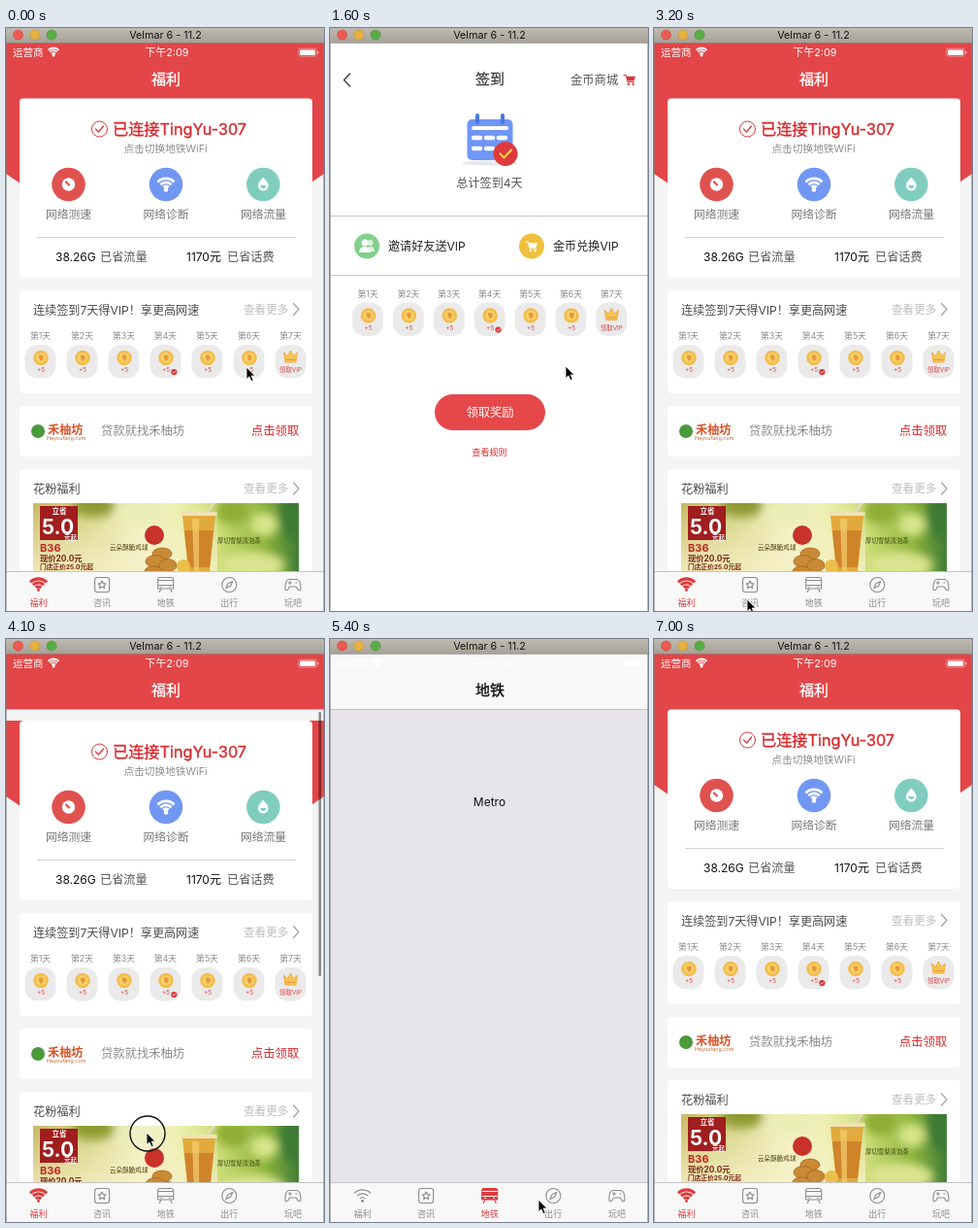
An HTML page that plays this animation: 328x600 px, repeating every 7100 ms.

```html
<!DOCTYPE html>
<html lang="zh-CN">
<head>
<meta charset="utf-8">
<title>App demo</title>
<style>
html, body { margin: 0; width: 100%; height: 100%; overflow: hidden; background: #fff; }
svg { display: block; }
#stage { width: 328px; height: 600px; overflow: hidden; }
text { font-family: Inter, "Noto Sans CJK SC", "Noto Sans CJK", sans-serif; }
.m { text-anchor: middle; }
.b { font-weight: 700; }
.med { fill: currentColor; stroke: currentColor; stroke-width: .35; }
.line { fill: none; stroke: currentColor; stroke-linecap: round; stroke-linejoin: round; }
.tab { color: #8b8b8b; }
.tab.on { color: #dc3c3e; }
.arc { stroke-linecap: butt; }
.on .arc { stroke-width: 3.1; }
.on .body { fill: currentColor; }
.on .seam { stroke: #f8f8f8; }
.off { display: none; }
</style>
</head>
<body>
<svg id="stage" viewBox="0 0 328 600">
  <defs>
    <linearGradient id="chrome" x2="0" y2="1">
      <stop stop-color="#bfbab0"/><stop offset="1" stop-color="#a5a198"/>
    </linearGradient>
    <linearGradient id="meadow">
      <stop stop-color="#c9b865"/><stop offset=".2" stop-color="#d5d384"/>
      <stop offset=".4" stop-color="#f5f1c4"/><stop offset=".55" stop-color="#ecefae"/>
      <stop offset=".7" stop-color="#cbdc76"/><stop offset=".87" stop-color="#8db33b"/>
      <stop offset="1" stop-color="#437f38"/>
    </linearGradient>
    <linearGradient id="haze" x2="0" y2="1">
      <stop stop-color="#f6f0c8" stop-opacity="0"/><stop offset=".6" stop-color="#f6f0c8" stop-opacity=".8"/>
    </linearGradient>
    <filter id="soft"><feGaussianBlur stdDeviation="5"/></filter>

    <g id="wifi" class="line">
      <path class="arc" d="M-8.5-2.6a12 12 0 0 1 17 0M-5.6.2a8 8 0 0 1 11.2 0M-2.7 3a4 4 0 0 1 5.4 0"/>
      <circle cy="5.4" r=".9" fill="currentColor"/>
    </g>
    <rect id="badge" x="-16" y="-17" width="32" height="34.5" rx="13" fill="#ebeaea"/>
    <g id="coin">
      <use href="#badge"/>
      <circle cx=".5" cy="-3.5" r="7.8" fill="#f3bf50"/>
      <circle cx=".5" cy="-3.5" r="5.9" fill="#f8cf62" stroke="#eeb048" stroke-width=".8"/>
      <path d="M-1.5-6.500v3l2 3.500 2.500-2.500v-3l-1.500-1z" fill="#e59a3a"/>
      <text class="m" y="11" x=".5" font-size="6.5" fill="#dc4446">+5</text>
    </g>
    <g id="crown">
      <use href="#badge"/>
      <path d="M-7-9l4 3.5L0-11l3 5.5L7-9 5.5 1h-11z" fill="#f5c453" stroke="#eeb048" stroke-linejoin="round"/>
      <path d="M-5-1.5H5" stroke="#e59a3a"/>
      <text class="m" y="11" font-size="6.4" fill="#dc4446">领取VIP</text>
    </g>
    <g id="more">
      <text x="245" font-size="11.6" fill="#bdbdbd">查看更多</text>
      <path class="line" d="M296.5-10l5.5 6-5.5 6" color="#a3a3a3" stroke-width="1.2"/>
    </g>
    <g id="cart">
      <path class="line" d="M-6-5h2.3l1.700 7h6.5"/>
      <path d="M-3.6-3.8H6L4.6 1h-7z" fill="currentColor"/>
      <circle cx="-1.3" cy="4.3" r="1.2" fill="currentColor"/><circle cx="3.7" cy="4.3" r="1.2" fill="currentColor"/>
    </g>
    <g id="status" color="#fff" fill="#fff" font-size="10.5">
      <text x="7" y="29">运营商</text>
      <use href="#wifi" transform="translate(49 24.5) scale(.66)" stroke-width="2.8"/>
      <text class="m" x="166" y="29" font-size="10.8">下午2:09</text>
      <rect x="301.7" y="21.2" width="18.6" height="8" rx="2" fill="none" stroke="#fff" stroke-opacity=".5" stroke-width=".8"/>
      <rect x="303" y="22.5" width="16" height="5.4" rx="1"/>
      <rect x="321.2" y="23.7" width="1.2" height="3" rx=".6" opacity=".6"/>
    </g>
  </defs>

  <g id="main">
    <g id="home">
      <rect width="328" height="600" fill="#f4f4f4"/>
      <g id="scroll">
        <path d="M0 72H328V150L314 159.500H14L0 150z" fill="#e24648"/>
        <g fill="#fff">
          <rect x="14" y="72" width="302" height="185" rx="4.5"/>
          <rect x="14" y="270" width="302" height="106" rx="4.5"/>
          <rect x="14" y="389" width="302" height="52" rx="4.5"/>
          <rect x="14" y="454" width="302" height="160" rx="4.5"/>
        </g>

        <g class="line" color="#d9393b">
          <circle cx="96.5" cy="104" r="8"/><path d="M92.5 104l3 3 5-6" stroke-width="1.3"/>
        </g>
        <text class="med" x="110" y="110" font-size="16.2" color="#d8292c">已连接TingYu-307</text>
        <text class="m" x="164.5" y="128" font-size="10.7" fill="#8c8c8c">点击切换地铁WiFi</text>

        <circle cx="64.5" cy="161" r="17.3" fill="#e05250"/>
        <circle cx="64.5" cy="161" r="6.7" fill="#fff"/>
        <path class="line" d="M65 161.500l-3-3" color="#e05250" stroke-width="2.2"/>
        <circle cx="165" cy="161" r="17.3" fill="#7197f3"/>
        <use href="#wifi" transform="translate(165 161)" color="#fff" stroke-width="2.8"/>
        <circle cx="265.3" cy="161" r="17.3" fill="#80cdbf"/>
        <path d="M265.3 153.500c3 3.600 5.3 5.800 5.3 8.800a5.3 5.3 0 0 1-10.6 0c0-3 2.3-5.2 5.3-8.800z" fill="#fff"/>
        <path d="M262.300 162h6a3 3 0 0 1-6 0z" fill="#80cdbf"/>
        <g class="m" font-size="11.8" fill="#777">
          <text x="64.5" y="196">网络测速</text><text x="165" y="196">网络诊断</text><text x="265.5" y="196">网络流量</text>
        </g>

        <path d="M32 215.500H299" stroke="#d2d2d2"/>
        <g font-size="12" fill="#111">
          <text x="51" y="240">38.26G</text><text x="186" y="240">1170元</text>
          <g fill="#555" font-size="12.2"><text x="97" y="240">已省流量</text><text x="228" y="240">已省话费</text></g>
        </g>

        <text x="28" y="294.7" font-size="12.1" fill="#4c4c4c">连续签到7天得VIP！享更高网速</text>
        <use href="#more" y="293.5"/>
        <g id="homeDays"></g>

        <circle cx="33" cy="415" r="7" fill="#4b9a3c"/>
        <text class="b" x="43" y="418" font-size="12.2" fill="#d9562c">禾柚坊</text>
        <text x="42" y="424" font-size="5.4" fill="#c0662f">Heyoufang.com</text>
        <text x="98" y="419" font-size="12.3" fill="#8a8a8a">贷款就找禾柚坊</text>
        <text x="253" y="419" font-size="12.3" fill="#d8292c">点击领取</text>

        <text x="28" y="478.5" font-size="12.2" fill="#4c4c4c">花粉福利</text>
        <use href="#more" y="478"/>
        <svg x="28" y="489" width="274" height="110">
          <rect width="274" height="110" fill="url(#meadow)"/>
          <g filter="url(#soft)">
            <ellipse cx="62" cy="4" rx="22" ry="12" fill="#8a962c"/>
            <ellipse cx="112" cy="10" rx="26" ry="14" fill="#e9edb4"/>
            <ellipse cx="206" cy="8" rx="18" ry="14" fill="#8fae36"/>
            <ellipse cx="238" cy="22" rx="14" ry="12" fill="#d8e68c"/>
            <ellipse cx="268" cy="12" rx="14" ry="26" fill="#3d7a36"/>
            <ellipse cx="226" cy="64" rx="34" ry="14" fill="#dbe48e"/>
          </g>
          <rect width="190" height="110" fill="url(#haze)"/>
          <rect x="7" y="3" width="39" height="35" fill="#a01e1e"/>
          <g fill="#fff">
            <text class="m b" x="27" y="11" font-size="7.5">立省</text>
            <text class="b" x="9" y="32" font-size="21">5.0</text>
            <text class="b" x="32" y="37.5" font-size="6.4">元起</text>
          </g>
          <g class="b" fill="#7a2414">
            <text x="7" y="50" font-size="11" fill="#c3281f">B36</text>
            <text x="7" y="60" font-size="8.3">现价20.0元</text>
            <text x="7" y="68" font-size="6.7">门店正价25.0元起</text>
          </g>
          <text x="79" y="48" font-size="6.6" fill="#4b3a10">云朵酥脆鸡球</text>
          <circle cx="125" cy="33" r="10" fill="#c8322b"/>
          <g fill="#c98a35" stroke="#a9661f" stroke-width=".8">
            <ellipse cx="133" cy="52" rx="10" ry="6"/><ellipse cx="126" cy="60" rx="10" ry="6.5"/>
            <ellipse cx="139" cy="64" rx="9" ry="6.5"/><ellipse cx="124" cy="70" rx="9" ry="5"/>
          </g>
          <path d="M176 14L188-2" stroke="#e7d9b8" stroke-width="2.5"/>
          <path d="M154 12H188L181 80H161z" fill="#e2aa3c"/>
          <path d="M156 28H186L182 66H160z" fill="#d0842a"/>
          <path d="M164 16h7v54h-5z" fill="#f3cf6f" opacity=".7"/>
          <rect x="152" y="9" width="38" height="4" rx="2" fill="#f0e3b4"/>
          <circle cx="155" cy="65" r="7" fill="#eac04a"/>
          <text x="190" y="41" font-size="6.4" fill="#3f4a10">厚切雪梨清泡茶</text>
        </svg>
      </g>
      <rect y="15" width="328" height="57.5" fill="#e24648"/>
      <use href="#status"/>
      <text class="m med" x="165" y="58" font-size="15" color="#fff">福利</text>
      <rect id="bar" x="322.5" y="75" width="2.5" height="272" rx="1.25" fill="#000" fill-opacity=".45"/>
    </g>

    <g id="plain">
      <rect width="328" height="600" fill="#e7e5eb"/>
      <rect y="15" width="328" height="57" fill="#f8f8f8"/>
      <path d="M0 72.500H328" stroke="#c2c1c5"/>
      <use href="#status"/>
      <text id="heading" class="m med" x="165" y="58" font-size="15" color="#111"></text>
      <text id="metro" class="m" x="164.5" y="172" font-size="12" fill="#111">Metro</text>
    </g>

    <rect y="559" width="328" height="41" fill="#f8f8f8"/>
    <path d="M0 559.500H328" stroke="#c6c6c6"/>
    <g id="tabs"></g>
  </g>

  <g id="sign">
    <rect width="328" height="600" fill="#fff"/>
    <path class="line" d="M20.500 47l-6 6.500 6 6.500" color="#444" stroke-width="1.5"/>
    <text class="m med" x="165" y="58" font-size="15" color="#444">签到</text>
    <text x="248" y="57.5" font-size="12.3" fill="#555">金币商城</text>
    <use href="#cart" x="309" y="53.5" color="#d9393b"/>

    <ellipse cx="165" cy="139" rx="29" ry="2.5" fill="#e8e8ec"/>
    <rect x="141.5" y="94" width="47" height="42" rx="5" fill="#6f96f6"/>
    <rect x="146" y="101" width="38" height="4" rx="2" fill="#fff"/>
    <path d="M152 90v7M178 90v7" stroke="#4d78e4" stroke-width="4" stroke-linecap="round"/>
    <path d="M148 113h7M161 113h7M174 113h7M148 124h7M161 124h7" stroke="#fff" stroke-width="4.5" stroke-linecap="round"/>
    <circle cx="181" cy="129.5" r="12.5" fill="#df3a3c"/>
    <path class="line" d="M175.500 129.500l4 4 7.500-8" color="#f8cf4e" stroke-width="2.2"/>
    <text class="m" x="164.5" y="163.5" font-size="12.1" fill="#555">总计签到4天</text>

    <path d="M0 193.500H328M0 254.500H328" stroke="#c4c4c4"/>
    <circle cx="38" cy="224.5" r="13" fill="#82d08b"/>
    <g fill="#fff">
      <circle cx="41.5" cy="221" r="3" opacity=".7"/><path d="M38 230c0-7 8-7 8 0z" opacity=".7"/>
      <circle cx="36" cy="221" r="3.5"/><path d="M30 231c0-8 12-8 12 0z"/>
    </g>
    <circle cx="208" cy="224.5" r="13" fill="#efc03c"/>
    <use href="#cart" x="208" y="225" color="#fff"/>
    <g font-size="12.1" fill="#222">
      <text x="60" y="228.5">邀请好友送VIP</text><text x="230" y="228.5">金币兑换VIP</text>
    </g>
    <g id="signDays"></g>

    <rect x="108" y="377" width="114" height="37" rx="18.5" fill="#e6484a"/>
    <text class="m" x="165" y="400" font-size="12.3" fill="#fff">领取奖励</text>
    <text class="m" x="164.5" y="439.5" font-size="9" fill="#d8292c">查看规则</text>
  </g>

  <path d="M.5 15V600M327.500 15V600" stroke="#777" stroke-opacity=".45"/>
  <rect width="328" height="15.5" fill="url(#chrome)"/>
  <path d="M0 15.500H328" stroke="#777" stroke-opacity=".4"/>
  <g stroke="#000" stroke-opacity=".15" stroke-width=".6">
    <circle cx="12.5" cy="7" r="5.3" fill="#ea5a50"/><circle cx="29.8" cy="7" r="5.3" fill="#e6b040"/><circle cx="47" cy="7" r="5.3" fill="#58ad45"/>
  </g>
  <text class="m" x="164.5" y="11" font-size="10.8" fill="#151515">Velmar 6 - 11.2</text>

  <g id="cursor">
    <circle id="ring" cx="1" cy="1" r="18" fill="#fff" fill-opacity=".2" stroke="#111" stroke-width="1.4"/>
    <path d="M0 0V12.500L2.900 9.900 5 14.600 7.200 13.600 5.200 9H9z" fill="#000" stroke="#fff" stroke-width=".9"/>
  </g>
</svg>

<script>
const LOOP = 7100, STEP = 100;
const $ = id => document.getElementById(id);

function dayRow(x0, gap, y) {
  return [1, 2, 3, 4, 5, 6, 7].map(n => {
    const x = x0 + (n - 1) * gap;
    const done = n === 4
      ? `<circle cx="${x + 8.8}" cy="${y + 11}" r="3.1" fill="#dc3638"/>
         <path class="line" d="M${x + 7.4} ${y + 11}l1.2 1.2 1.8-2.2" color="#fff" stroke-width=".7"/>` : '';
    return `<text class="m" x="${x}" y="${y - 23}" font-size="8.8" fill="#8c8c8c">第${n}天</text>
      <use href="#${n < 7 ? 'coin' : 'crown'}" x="${x}" y="${y}"/>${done}`;
  }).join('');
}
$('homeDays').innerHTML = dayRow(35.5, 43, 343);
$('signDays').innerHTML = dayRow(39, 41.9, 299.5);

const star = 'M0-4l1.2 2.6 2.8.3-2.1 1.9.6 2.8L0 2.2l-2.5 1.4.6-2.8L-4-1.1l2.8-.3z';
const tabs = [
  ['福利', '<use href="#wifi"/>'],
  ['咨讯', `<rect class="body" x="-7.5" y="-7.5" width="15" height="15" rx="2.5"/><path class="seam" d="${star}"/>`],
  ['地铁', '<path class="body" d="M-6-7.5H6a2 2 0 0 1 2 2V4H-8V-5.5a2 2 0 0 1 2-2z"/><path class="seam" d="M-7.5-4.5h15M-7.5.5h15M-5 2.3h1M4 2.3h1"/><path d="M-5 4.5l-1.5 3M5 4.5l1.5 3"/>'],
  ['出行', '<circle class="body" r="7.5"/><path class="seam" d="M3.5-3.5L1.3 1.3-3.5 3.5-1.3-1.3z"/>'],
  ['玩吧', '<path class="body" d="M-4-5.5H4c3 0 4 4 4 9.5 0 2.5-2.5 2-3.5 0L3.5 2h-7l-1 2c-1 2-3.5 2.5-3.5 0 0-5.5 1-9.5 4-9.5z"/><path class="seam" d="M-4.5-2h3M-3-3.5v3M3-2h1"/>']
];
$('tabs').innerHTML = tabs.map(([name, icon], i) =>
  `<g class="tab" transform="translate(${33.5 + i * 65.6} 573)">
    <g class="line" stroke-width="1.1">${icon}</g>
    <text class="m" y="21.5" font-size="9" fill="currentColor">${name}</text></g>`).join('');
const tabNodes = [...$('tabs').children];
// The first icon is inlined so that its arcs can follow the tab state.
tabNodes[0].querySelector('use').replaceWith(...[...$('wifi').children].map(n => n.cloneNode()));

// Each key is [ms, value, easing towards the next key].
function play(id, prop, keys, format = v => v) {
  const frames = keys.map(([ms, v, easing = 'linear']) => ({ offset: ms / LOOP, [prop]: format(v), easing }));
  const anim = $(id).animate(frames, { duration: LOOP, iterations: Infinity });
  anim.pause();
  return anim;
}
const moveX = v => `translate(${v}px, 0px)`;
const moveY = v => `translate(0px, ${v}px)`;
const move = ([x, y]) => `translate(${x}px, ${y}px)`;
const glide = 'cubic-bezier(.3, .8, .4, 1)', ease = 'ease-in-out';

const anims = [
  play('sign', 'transform', [[0, 328], [800, 328, glide], [1200, 0], [2500, 0, glide], [2900, 328], [LOOP, 328]], moveX),
  play('main', 'transform', [[0, 0], [800, 0, glide], [1200, -98], [2500, -98, glide], [2900, 0], [LOOP, 0]], moveX),
  play('scroll', 'transform', [[0, 0], [3800, 0], [4100, 12], [4300, 20, 'ease-out'], [4700, 0], [LOOP, 0]], moveY),
  play('bar', 'opacity', [[0, 0], [3800, 0], [3900, 1], [4600, 1], [4800, 0], [LOOP, 0]]),
  play('cursor', 'transform', [
    [0, [248, 349], ease], [600, [279, 290]], [700, [281, 288]], [1000, [281, 288], ease],
    [1600, [243, 348], ease], [2300, [17, 52]], [2500, [17, 52], ease],
    [3200, [96, 588]], [3300, [97, 585], ease], [3800, [145, 484]], [4100, [145, 508]],
    [4300, [145, 524], ease], [4600, [98, 576]], [4800, [98, 576], ease],
    [5000, [164, 576]], [5200, [164, 576], ease], [5400, [215, 577]], [5500, [229, 575]],
    [5700, [229, 575], ease], [6000, [296, 574]], [6200, [296, 574], ease],
    [6500, [34, 574]], [6800, [34, 574], 'ease-in'], [7000, [26, 606]], [LOOP, [26, 606]]
  ], move)
];

const taps = [[0, 0], [4800, 1], [5200, 2], [5700, 3], [6200, 4], [6700, 0]];
const presses = [[700, 800], [2400, 2500], [3800, 4300], ...taps.slice(1).map(([ms]) => [ms - 100, ms])];

function tick(now) {
  const t = Math.floor(now % LOOP / STEP) * STEP;
  for (const a of anims) a.currentTime = t;
  const active = taps.findLast(([ms]) => ms <= t)[1];
  tabNodes.forEach((node, i) => node.classList.toggle('on', i === active));
  $('home').classList.toggle('off', active !== 0);
  $('plain').classList.toggle('off', active === 0);
  $('metro').classList.toggle('off', active !== 2);
  $('heading').textContent = tabs[active][0];
  $('ring').classList.toggle('off', !presses.some(([a, b]) => t >= a && t < b));
}

const start = performance.now();
function loop() {
  tick(performance.now() - start);
  requestAnimationFrame(loop);
}
loop();
</script>
</body>
</html>
```
